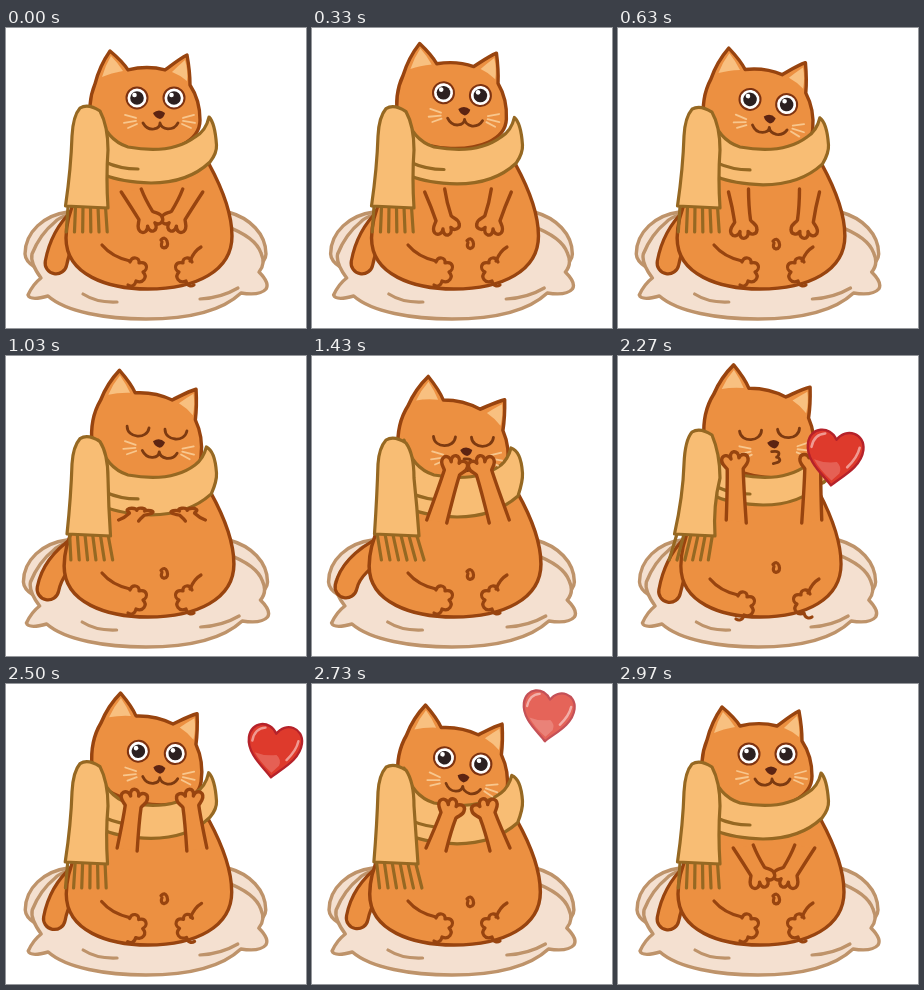
Recreate the animation shown at these times as an HTML page. Size 300 by 300 pixels, loop 3010 ms.

```html
<!DOCTYPE html>
<html lang="en">
<head>
<meta charset="utf-8">
<title>Cat blowing a kiss</title>
<style>
html, body { margin: 0; width: 100%; height: 100%; overflow: hidden; background: #fff; }
svg { display: block; width: 100vw; height: 100vh; }
path, circle { stroke-linecap: round; stroke-linejoin: round; }
.fur { fill: #ec9041; stroke: #98440f; stroke-width: 3.4; }
.line { fill: none; stroke: #98440f; stroke-width: 3.2; }
.face { fill: none; stroke: #7d3a10; stroke-width: 2.8; }
.wool { fill: #f8bd74; stroke: #966822; stroke-width: 3.2; }
.fold { fill: none; stroke: #966822; stroke-width: 3.2; }
.pillow { fill: #f4e0d0; stroke: #be936a; stroke-width: 3.4; }
.seam { fill: none; stroke: #be936a; stroke-width: 3.2; }
.whisker { fill: none; stroke: #f8c78e; stroke-width: 1.8; }
</style>
</head>
<body>
<svg viewBox="0 0 300 300">
  <g id="pillow">
    <path class="pillow" d="M62 184C38 187 19 204 19 226C21 268 259 268 260 226C260 206 244 190 222 184Z"/>
    <path class="pillow" d="M49 194Q34 206 26 226Q24 235 35 250Q27 256 22 267Q24 273 42 268C60 284 100 291 140 291C182 291 216 283 235 265Q254 268 260 261Q264 255 253 244Q260 236 255 225C240 180 70 170 49 194Z"/>
    <path class="seam" d="M77 266Q91 275 111 274M194 271Q215 270 232 260"/>
  </g>

  <path id="tailEdge" fill="none" stroke="#98440f" stroke-width="25"/>
  <path id="tail" fill="none" stroke="#ec9041" stroke-width="18.500"/>

  <path class="fur" id="body" d="M92 130C76 155 60 182 60 210C60 247 102 261 142 261C190 261 226 243 226 208C226 184 216 160 203 136Z"/>
  <g id="leftFoot"><path class="line" d="M96 217Q106 229 124 233"/><path class="line toes"/></g>
  <g id="rightFoot"><path class="line" d="M195 219Q188 223 184 233"/><path class="line toes" transform="matrix(-1 0 0 1 310 0)"/></g>
  <path class="line" id="navel" d="M-3 -3Q1 -7 3 -2Q5 4 0 5Q-4 4 -2 -1"/>

  <g id="head">
    <path class="fur" d="M86 100C82 82 84 68 89 56C92 44 97 33 104 23C110 28 117 34 122 42C134 39 148 39 159 42C166 37 173 31 181 27C183 38 184 48 184 57C190 66 194 78 194 92C194 135 86 135 86 100Z"/>
    <path fill="#f8c080" d="M96 49Q99 38 105 28Q112 35 117 43Q105 45 96 49ZM166 44Q172 38 179 32Q182 42 181 53Q174 47 166 44Z"/>
  </g>
  <path class="wool" id="band"/>
  <path class="fold" id="bandFold"/>
  <path class="fold" id="fringe"/>
  <path class="wool" id="scarf"/>

  <g id="face">
    <path class="whisker" d="M119 87L130 90M118 95L130 93M122 100L131 96M188 87L177 90M189 95L177 93M185 100L176 96"/>
    <g id="eyesOpen"></g>
    <path class="face" id="eyesShut" d="M120 72C121 84 141 84 142 72M158 72C159 84 179 84 180 72"/>
    <path class="face" id="smile" d="M137 95Q141 102 148 101Q154 100 154 95Q155 100 162 101Q169 101 172 95"/>
    <path class="face" id="kiss" d="M151 94Q161 93 157 99Q154 100 157 100Q162 105 152 106"/>
    <path fill="#5c2412" d="M147 85Q153 80 159 85Q158 90 154 91Q149 90 147 85Z"/>
  </g>

  <path class="fur" id="rightArm"/>
  <path class="fur" id="leftArm"/>

  <g id="heart">
    <path fill="#de3a2c" stroke="#b5222a" stroke-width="2.4" d="M0 29C-8 20 -28 8 -28 -10C-28 -27 -8 -31 0 -17C8 -31 28 -27 28 -10C28 8 8 20 0 29Z"/>
    <path fill="#ea7a70" d="M-20 5Q-9 8 3 5Q9 9 7 16L0 24Q-13 15 -20 5Z" opacity=".6"/>
    <path fill="none" stroke="#f09a92" stroke-width="2.6" d="M-24 -7Q-23 -20 -12 -22M24 -12Q23 -2 14 9"/>
  </g>
</svg>

<script>
const LOOP = 3010;
const el = id => document.getElementById(id);
const set = (id, name, value) => el(id).setAttribute(name, value);
const show = (id, on) => set(id, 'visibility', on ? 'visible' : 'hidden');
const clamp = (v, low, high) => Math.max(low, Math.min(high, v));

// tilt: head lean, squash: body width, nod: face turn, wag: tail, sway: scarf,
// spread and reach: distance of the paws from the middle and their height.
const rest = { at: 0, tilt: 0, squash: 0, nod: 0, wag: 0, sway: 0, spread: 11, reach: 196 };
const poses = [
  rest,
  { at: 630, tilt: 0.55, squash: 0.3, nod: 8, wag: 0, sway: 0, spread: 30, reach: 203 },
  { at: 1430, tilt: 1, squash: 1, nod: 1, wag: 1, sway: 1, spread: 13, reach: 107 },
  { at: 1870, tilt: 1.08, squash: 0.9, nod: 1, wag: 0.25, sway: -1, spread: 13, reach: 107 },
  { at: 2270, tilt: 0.95, squash: -1, nod: -3, wag: -0.1, sway: -1, spread: 39, reach: 103 },
  { at: 2730, tilt: 0.78, squash: 0.8, nod: 10, wag: 0.3, sway: 0.8, spread: 16, reach: 122 },
  { ...rest, at: 2970 }
];

function poseAt(t) {
  const next = poses.findIndex(pose => pose.at > t);
  if (next < 0) return { ...rest, hop: 0 };
  const from = poses[next - 1], to = poses[next];
  const u = (t - from.at) / (to.at - from.at), eased = u * u * (3 - 2 * u);
  const pose = { hop: 6 * Math.sin(Math.PI * u) };
  for (const key in rest) pose[key] = from[key] + (to[key] - from[key]) * eased;
  return pose;
}

// Shoulder, wrist, three toes, wrist, shoulder; side is -1 for left, 1 for right.
function armPath(side, { spread, reach }) {
  const shoulder = 28 + spread / 4, shoulderY = 164;
  const up = clamp((shoulderY - reach) / 25, -1, 1);
  const lean = Math.atan2(shoulder - spread, Math.max(30, Math.abs(shoulderY - reach)));
  const c = Math.cos(lean), s = Math.sin(lean);
  const at = (x, y) => `${156 + side * x} ${y} `;
  const p = (u, v) => at(spread + u * c + v * s, reach + up * (v * c - u * s));
  return `M${at(shoulder + 10, shoulderY)}Q${p(8, 24)}${p(8, 10)}` +
    `C${p(10, 7)}${p(15, 4)}${p(13, -1)}C${p(11, -5)}${p(6, -4)}${p(4, 0)}` +
    `C${p(7, -9)}${p(-4, -10)}${p(-4, -1)}C${p(-6, -6)}${p(-13, -5)}${p(-13, 0)}` +
    `C${p(-14, 5)}${p(-9, 7)}${p(-8, 10)}Q${p(-8, 24)}${at(shoulder - 10, shoulderY + 3 * up)}`;
}

function drawScarf({ squash, sway }) {
  const left = 59.5 + 3 * sway, right = 102 + 5 * sway, hem = 178, top = 4 * squash;
  set('scarf', 'd', `M94 ${83 + top}Q82 ${75 + top} 74 ${80 + top}Q67 ${88 + top} 66 108` +
    `Q65 140 ${left} ${hem}L${right} ${hem + 2}Q${right - 2} 150 102 122Q102 98 94 ${83 + top}Z`);
  let strands = '';
  for (let u = 0.06; u < 1; u += 0.176) {
    const x = left + (right - left) * u;
    strands += `M${x} ${hem}L${x + 6 * sway + 4 * (u - 0.5)} ${hem + 26}`;
  }
  set('fringe', 'd', strands);

  const drop = 6 * squash, low = 155 + drop, tip = 203 - 4 * Math.abs(squash);
  set('band', 'd', `M92 84Q100 112 122 119Q165 127 189 109Q${tip - 3} 103 ${tip} ${89 + drop / 2}` +
    `Q209 95 210.5 117Q211 125 ${204 + drop / 3} ${134 + drop}Q182 ${low} 145 ${low}` +
    `Q115 ${low - 1} 99 ${147 + drop}Z`);
  set('bandFold', 'd', `M99 ${134 + drop / 2}Q114 ${141 + drop / 2} 132 ${141 + drop / 2}`);
}

function drawHeart(t) {
  const u = clamp((t - 2150) / 760, 0, 1);
  const x = 168 + 101 * Math.sin(Math.PI * u), y = 119 - 115 * u;
  const scale = Math.min(1, 0.3 + 5 * u) * (1.02 - 0.14 * u);
  show('heart', u > 0);
  set('heart', 'opacity', Math.min(1, (1 - u) / 0.3));
  set('heart', 'transform', `translate(${x} ${y}) rotate(7) scale(${scale})`);
}

function draw(t) {
  const pose = poseAt(t), { tilt, squash, nod, wag, hop } = pose;
  const kx = 0.16 * tilt, ky = 0.25 * tilt;
  const rise = tilt + 6 * squash - hop;
  set('head', 'transform', `matrix(1 ${ky} ${-kx} 1 ${100 * kx} ${rise - 142 * ky})`);
  set('face', 'transform',
    `translate(${1.5 * tilt} ${5.5 * tilt + 3.5 * squash - hop}) rotate(${nod} 150 70)`);

  const shut = t > 1000 && t < 2500, kissing = t > 1330 && t < 2480;
  show('eyesShut', shut);
  show('eyesOpen', !shut);
  show('kiss', kissing);
  show('smile', !kissing);

  const widen = (id, scale) => set(id, 'transform', `translate(142 0) scale(${scale} 1) translate(-142 0)`);
  widen('body', 1 + 0.035 * squash);
  widen('pillow', 1 + 0.02 * squash);
  const step = Math.max(0, -squash);
  set('leftFoot', 'transform', `translate(${-4 * step} ${6 * step})`);
  set('rightFoot', 'transform', `translate(${6 * step} ${4 * step})`);
  set('navel', 'transform', `translate(158 ${215 + 3.5 * squash})`);

  const x = 50 - 16 * wag, y = 235 - 4 * wag;
  for (const id of ['tailEdge', 'tail']) set(id, 'd', `M74 190Q${x + 5} 208 ${x} ${y}`);

  drawScarf(pose);
  set('leftArm', 'd', armPath(-1, pose));
  set('rightArm', 'd', armPath(1, pose));
  drawHeart(t);
}

for (const toes of document.querySelectorAll('.toes')) {
  toes.setAttribute('d', 'M124 234c2 -6 10 -5 9 1c8 -2 10 6 4 9c5 5 0 12 -7 9c-1 5 -5 6 -8 4');
}
el('eyesOpen').innerHTML = [131, 168].map(x => `<g transform="translate(${x} 70)">
  <circle r="10.5" fill="#fff" stroke="#7d3210" stroke-width="2"/>
  <circle r="6.8" fill="#2c2020"/><circle cx="-2.500" cy="-3" r="2.3" fill="#fff"/></g>`).join('');

const start = performance.now();
function tick() {
  draw((performance.now() - start) % LOOP);
  requestAnimationFrame(tick);
}
tick();
</script>
</body>
</html>
```
